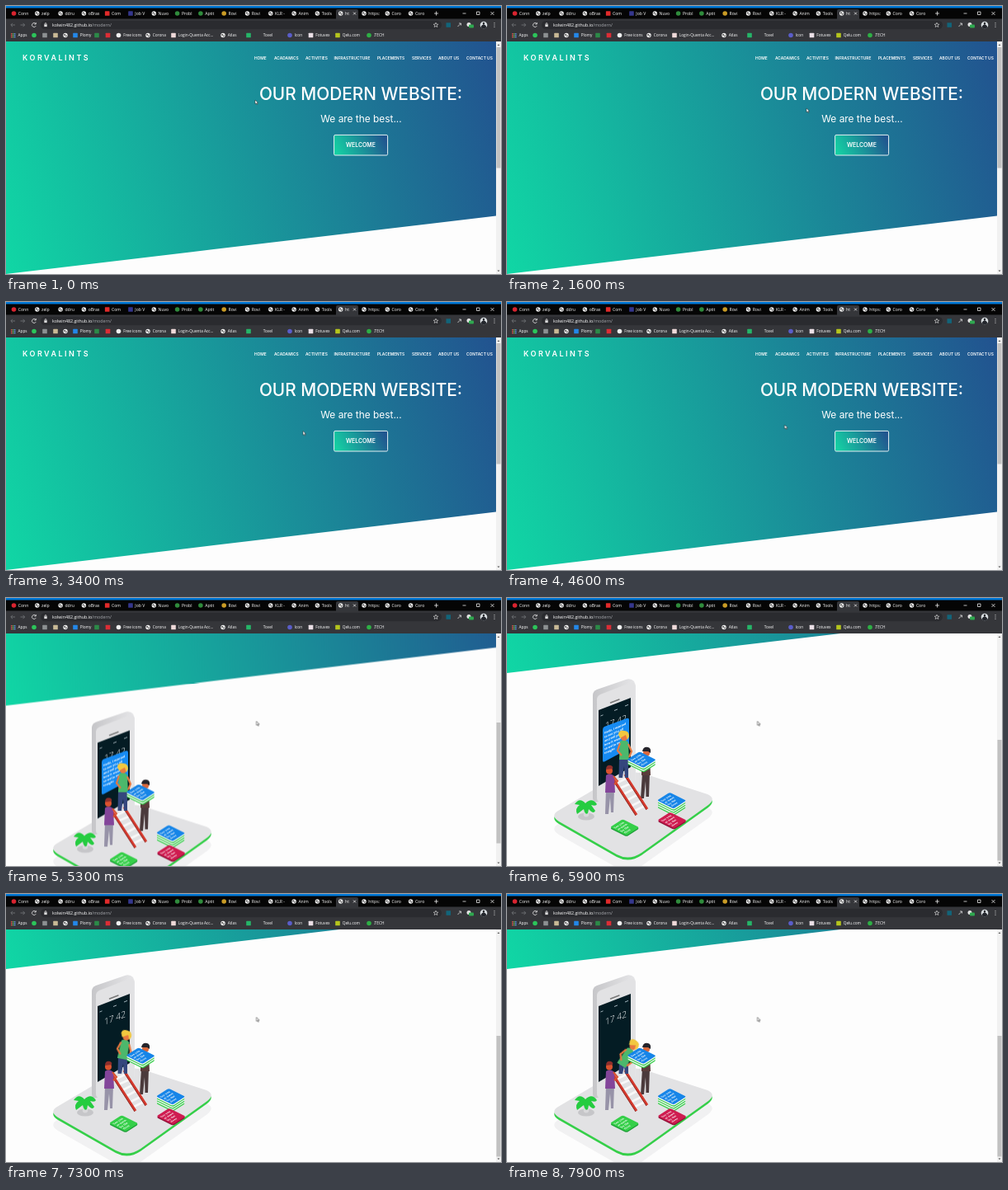
Animation, 600 px wide and 325 px high, one loop 8000 ms. Source, as an HTML page:

```html
<!DOCTYPE html>
<html lang="en">
<head>
<meta charset="utf-8">
<title>Modern website</title>
<style>
  html, body { margin: 0; width: 100%; height: 100%; overflow: hidden; background: #fdfdfd; }
  svg { display: block; width: 100vw; height: 100vh; }
  text { fill: #fff; white-space: pre; }
  .site { font-family: Inter, sans-serif; }
  .ui { font-family: "Open Sans", sans-serif; }
  .nav { font-size: 4.85px; font-weight: 600; }

  #page, #thumb, #cursor, #message, #upper, #legs { animation: 8s infinite; }
  #page { animation-name: scroll; }
  #thumb { animation-name: thumb; }
  #cursor { animation-name: point; }
  #message { animation-name: send; }
  #upper { animation-name: lean; transform-origin: 142px 195px; }
  #legs { animation-name: crouch; transform-origin: 142px 218px; }

  /* One 100 ms tick is 1.25 % of the loop. */
  @keyframes scroll {
    0%, 61.25% { transform: translateY(0); animation-timing-function: steps(4); }
    66.25% { transform: translateY(-194.5px); animation-timing-function: steps(4); }
    71.25%, 100% { transform: translateY(-234px); }
  }
  @keyframes thumb {
    0%, 61.25% { transform: translateY(0); animation-timing-function: steps(4); }
    66.25% { transform: translateY(101px); animation-timing-function: steps(4); }
    71.25%, 100% { transform: translateY(122px); }
  }
  @keyframes point {
    0% { transform: translate(302px, 114px); animation-timing-function: steps(1); }
    2.5% { transform: translate(302px, 114px); animation-timing-function: steps(14); }
    20% { transform: translate(363px, 124px); animation-timing-function: steps(18); }
    42.5% { transform: translate(360px, 156.5px); animation-timing-function: steps(12); }
    57.5% { transform: translate(336.5px, 149px); animation-timing-function: steps(3); }
    61.25%, 100% { transform: translate(303.5px, 149.5px); }
  }
  @keyframes send {
    0%, 87.5% { opacity: 1; animation-timing-function: steps(3); }
    91.25%, 100% { opacity: 0; }
  }
  @keyframes lean {
    0%, 88.75% { transform: none; animation-timing-function: steps(6); }
    96.25%, 100% { transform: translate(-3px, 12px) rotate(32deg); }
  }
  @keyframes crouch {
    0%, 88.75% { transform: none; animation-timing-function: steps(6); }
    96.25%, 100% { transform: scaleY(.6); }
  }
</style>
</head>
<body>
<svg viewBox="0 0 600 325" preserveAspectRatio="none">
  <defs>
    <linearGradient id="sea" gradientUnits="userSpaceOnUse" x1="-26" y1="278" x2="620" y2="90">
      <stop offset="0" stop-color="#10d9a5"/><stop offset="1" stop-color="#22508f"/>
    </linearGradient>
    <linearGradient id="button" x1="0" y1=".6" x2="1" y2=".4">
      <stop offset="0" stop-color="#15cfa3"/><stop offset="1" stop-color="#21558f"/>
    </linearGradient>
    <linearGradient id="metal" x1="0" x2="1">
      <stop offset="0" stop-color="#c6c6c9"/><stop offset="1" stop-color="#e6e6e8"/>
    </linearGradient>
    <path id="slab" d="M62 258L128 219Q150 206 172 215L243 238Q254 243 244 251L163 309Q148 319 133 311L63 271Q52 264 62 258Z"/>
    <g id="globe">
      <circle r="2.7" fill="#f1f1f1"/>
      <path d="M-1.8-1.2L.2-1.5 0 0-1.4.4ZM.4.3L1.9-.3 1.2 1.6 0 1.8Z" fill="#444"/>
    </g>
  </defs>

  <g id="page">
    <rect y="43" width="600" height="520" fill="#fdfdfd"/>
    <path d="M0 43H594V254.500L0 325Z" fill="url(#sea)"/>
    <g class="site">
      <text x="20" y="66" font-size="9" font-weight="600" letter-spacing="2.5">KORVALINTS</text>
      <g id="menu" class="nav"></g>
      <g text-anchor="middle">
        <text x="430" y="113.7" font-size="20.8" font-weight="500">OUR MODERN WEBSITE:</text>
        <text x="430.5" y="141.2" font-size="11.9">We are the best...</text>
        <rect x="397.6" y="156.4" width="65" height="24.6" rx="1.5" fill="url(#button)" stroke="#e4f0f2" stroke-width="1"/>
        <text x="430" y="171.3" font-size="6.9" font-weight="600">WELCOME</text>
      </g>
    </g>

    <g transform="translate(0 234)">
      <use href="#slab" y="16" fill="#f1f1f2"/>
      <use href="#slab" y="3" fill="#35cf49"/>
      <use href="#slab" fill="#e2e2e4"/>

      <!-- phone -->
      <path d="M104 118Q104 113 109 111L144 99Q150 97 154 101L156 106V221L110 247Q104 249 104 242Z" fill="url(#metal)"/>
      <path d="M109 123Q109 119 113 117L149 103Q155 101 155.500 108V221L114 246Q109 248 109 242Z" fill="#e2e2e4"/>
      <path d="M111 136L150 121V205L111 228Z" fill="#041c24"/>
      <path d="M125.500 127L136 123" stroke="#777" stroke-width="1.4" stroke-linecap="round"/>
      <path d="M113.500 143l3-1.2M130 136.500l4-1.600M143 131l4-1.600" stroke="#9fb0b8"/>
      <text class="ui" transform="matrix(.93 -.36 0 1 119 159)" font-size="11" font-weight="300">17 42</text>
      <g id="message">
        <path d="M118 156L145 146Q148 145 148 148V179Q148 182 145 184L119 198Q116 200 116 197V160Q116 157 118 156Z" fill="#168bf2"/>
        <g id="note" class="ui" transform="matrix(.92 -.4 0 1 118 165)" font-weight="700"></g>
      </g>

      <!-- plant -->
      <ellipse cx="96" cy="265" rx="10" ry="4.500" fill="#c6c6c9"/>
      <path d="M92 254H100L99 264Q96 267 93 264Z" fill="#d8d8da"/>
      <path d="M95 249Q88 241 82 250L88 251Q82 255 85 262L93 256Q95 264 98 261L99 256Q105 263 107 258L102 251Q108 253 109 250Q103 241 95 249Z" fill="#25cc40"/>

      <!-- right helper -->
      <path d="M164 212H173L172 241H168.500L168 222 166 243H162Z" fill="#4b3a3c"/>
      <path d="M163 194Q168 189 173 194L174 215H163Z" fill="#5a3d3b"/>
      <circle cx="169" cy="188" r="4" fill="#d9693c"/>
      <path d="M164 186Q165 180 171 181Q175 182 174 188L171 186Z" fill="#25242b"/>

      <!-- ladder -->
      <path d="M132 225L146 218M136 231L150 225M141 238L155 231M146 245L159 238M151 252L163 246M155 258L167 252" stroke="#f8f8f8" stroke-width="2.600"/>
      <path d="M128 218L157 263M143 214L170 256" stroke="#d5392c" stroke-width="3" fill="none"/>
      <path d="M129 222L156 264M144 218L169 257" stroke="#8f2925" stroke-width="1"/>

      <!-- climber -->
      <path id="legs" d="M136 193H147L147 218H143L142 204 140 218H135.500Z" fill="#35477d"/>
      <g id="upper">
        <path d="M137 174Q142 170 147 175L148 196H136Z" fill="#4cb86c"/>
        <path d="M137 176L134 185 139 191M147 177L151 186 148 193" fill="none" stroke="#e7783f" stroke-width="2.200"/>
        <circle cx="142" cy="169" r="4" fill="#e7783f"/>
        <path d="M135 165Q136 160 142 161Q148 161 148 168L146 172 144 166 137 170Z" fill="#f2c83f"/>
      </g>

      <!-- left helper -->
      <path d="M120 232H130L129 260H126L125 242 123 262H119Z" fill="#9793a8"/>
      <path d="M120 215Q125 211 130 216L131 236H119Z" fill="#83459a"/>
      <path d="M129 216L134 222 130 226" fill="none" stroke="#d9522f" stroke-width="2"/>
      <circle cx="124" cy="209.500" r="4" fill="#d9522f"/>
      <path d="M120 208Q120 202 126 203Q129 204 128 207Z" fill="#8d2f2c"/>

      <g id="cards"></g>
    </g>
  </g>

  <!-- scrollbar -->
  <rect x="594" y="43" width="6" height="282" fill="#f1f1f1"/>
  <path d="M595.500 48L597 46.200 598.500 48ZM595.500 320.500L597 322.300 598.500 320.500Z" fill="#555"/>
  <rect id="thumb" x="594.500" y="50" width="5" height="146.500" fill="#c1c1c1"/>

  <!-- browser -->
  <g class="ui">
    <rect width="600" height="16" fill="#050505"/>
    <rect width="600" height="2.500" fill="#0078d7"/>
    <path d="M400 16V6Q400 4 402 4H425Q427 4 427 6V16Z" fill="#35363a"/>
    <rect y="15.500" width="600" height="27.500" fill="#35363a"/>
    <rect x="42" y="17.700" width="486" height="10.600" rx="5.300" fill="#2a2b2f"/>
    <g id="tabs" font-size="5.1"></g>
    <g fill="none" stroke="#e8e8e8" stroke-width=".8">
      <path d="M421 7.500L424 10.500M424 7.500L421 10.500M519 9H524M521.500 6.500V11.500M553.500 9H557.500M570.500 7H574V10.500H570.500ZM587.500 7L591.500 11M591.500 7L587.500 11"/>
      <path d="M11 23H6M8 20.800L5.800 23 8 25.200M17.500 23H22.500M20.500 20.800L22.700 23 20.500 25.200" stroke="#77797d"/>
      <path d="M40 21.500A2.500 2.500 0 1 0 40.300 24M40.300 20V22H38.300" transform="translate(-4)"/>
      <path d="M47 22.500V21.300Q48 19.800 49 21.300V22.500"/>
      <path d="M521 20.200L521.800 22.100 523.800 22.200 522.300 23.500 522.800 25.500 521 24.400 519.200 25.500 519.700 23.500 518.200 22.200 520.200 22.100Z" stroke-width=".6"/>
    </g>
    <rect x="46.300" y="22.300" width="3.400" height="2.800" fill="#ddd"/>
    <text x="56" y="24.900" font-size="5.3">kolwin482.github.io<tspan fill="#a5a8ac">/modern/</tspan></text>
    <rect x="533.500" y="20.300" width="5.500" height="5.500" fill="#12647a"/>
    <path d="M547.500 25L551.500 21M549 21H551.500V23.500" fill="none" stroke="#ddd" stroke-width=".8"/>
    <circle cx="561" cy="22.500" r="2.500" fill="#e4e4e4"/>
    <rect x="561" y="22.500" width="6" height="4" rx="1" fill="#2fa84f"/>
    <circle cx="579" cy="23" r="4.300" fill="#d8dde0"/>
    <path d="M575.700 26Q576 23 578.500 22.800Q576.800 20 579 19.700Q581.200 20 579.500 22.800Q582 23 582.300 26Q579 28.500 575.700 26Z" fill="#23262c"/>
    <path d="M592 20.200v1m0 1.300v1m0 1.300v1" stroke="#ddd"/>
    <g id="bookmarks" font-size="4.75"></g>
  </g>

  <path id="cursor" d="M0 0V4.800L1.200 3.800 2 5.600 2.900 5.200 2.100 3.400H3.600Z" fill="#fff" stroke="#222" stroke-width=".5"/>
</svg>

<script>
  const fill = (id, parts) => { document.getElementById(id).innerHTML = parts.join(""); };
  const label = (x, y, words) => `<text x="${x}" y="${y}">${words}</text>`;

  // A colour ending in "o" gives a disc; an empty one gives a globe.
  const icon = (x, y, colour) => {
    if (!colour) return `<use href="#globe" x="${x}" y="${y}"/>`;
    return colour.endsWith("o")
      ? `<circle cx="${x}" cy="${y}" r="2.8" fill="${colour.slice(0, -1)}"/>`
      : `<rect x="${x - 2.8}" y="${y - 2.8}" width="5.6" height="5.6" rx=".6" fill="${colour}"/>`;
  };

  const tabs = [
    ["Conn", "#d8232fo"], ["zelp"], ["ddru"], ["oBrax"], ["Com", "#e02a2a"], ["Job V", "#34368c"],
    ["Nuvo"], ["Probl", "#2f8b3co"], ["Aptit", "#2f8b3co"], ["Rovi", "#c99b25o"], ["Rovi"], ["KLR -"],
    ["Anim"], ["Tools"], ["ht"], ["https:"], ["Coro"], ["Coro"]
  ];
  fill("tabs", tabs.map(([words, colour], i) => {
    const x = 9.5 + i * 28.3;
    return icon(x, 9, colour) + label(x + 5.3, 10.9, words);
  }));

  const bookmarks = [
    [34, "#2cc45ao"], [47, "#8c9092"], [60, "#c8b995"], [72], [84, "#2487e8", "Plomy"],
    [110, "#2c8a48"], [123.5, "#dc2d35"], [136.5, "#f0f0f0o", "Free icons"], [172, "", "Corona"],
    [203, "#eed9d9", "Login-Quenta Acc..."], [263, "", "Atlas"], [294, "#25b568"],
    [306, "none", "Tovel"], [344, "#5a5dc9o", "Icon"], [369.5, "#eadfe6", "Fotuvex"],
    [402, "#b5c51d", "Qelu.com"], [440, "#2eaf45o", ".TECH"]
  ];
  const apps = Array.from({ length: 9 }, (_, i) =>
    `<rect x="${6 + i % 3 * 2}" y="${33 + Math.floor(i / 3) * 2}" width="1.4" height="1.4" fill="${["#e55b4d", "#65b768", "#5c94e8"][i % 3]}"/>`);
  fill("bookmarks", [...apps, label(14.5, 37.2, "Apps"), ...bookmarks.map(([x, colour, words = ""]) =>
    icon(x, 35.5, colour) + label(x + 5.7, 37.2, words))]);

  const menu = {
    HOME: 301, ACADAMICS: 325, ACTIVITIES: 363, INFRASTRUCTURE: 397.5,
    PLACEMENTS: 450, SERVICES: 492, "ABOUT US": 524, "CONTACT US": 558
  };
  fill("menu", Object.entries(menu).map(([words, x]) => label(x, 64.6, words)));

  fill("note", ["Hello, I wanted", "to see you all", "and tell you", "how it went", "so write me", "tonight"]
    .map((line, i) => `<text y="${i * 4.9}" font-size="3.8">${line}</text>`));

  // (x, y) is the left corner of the top card; layers run from the lowest to the top.
  const card = (x, y, layers) => layers.map((colour, i) => {
    const drop = (layers.length - 1 - i) * 1.4;
    return `<rect width="17" height="20" rx="2" fill="${colour}" transform="matrix(.9 -.58 1 .5 ${x} ${y + drop})"/>`;
  }).join("") + `<g transform="matrix(.9 -.58 1 .5 ${x} ${y})" font-size="3.8" font-weight="800">` +
    ["See you", "at noon", "by the", "river"].map((line, i) => label(1.5, 5 + i * 4, line)).join("") + "</g>";

  const blue = "#1685e8", green = "#35cf49", white = "#f4f4f4";
  fill("cards", [
    card(145.5, 196, [green, white, green, white, blue]),
    card(182, 245.5, [green, white, green, white, green, white, blue]),
    card(182.5, 269.5, ["#8f1238", "#cf1c50"]),
    card(125, 278, ["#1e9f38", green])
  ]);
</script>
</body>
</html>
```
